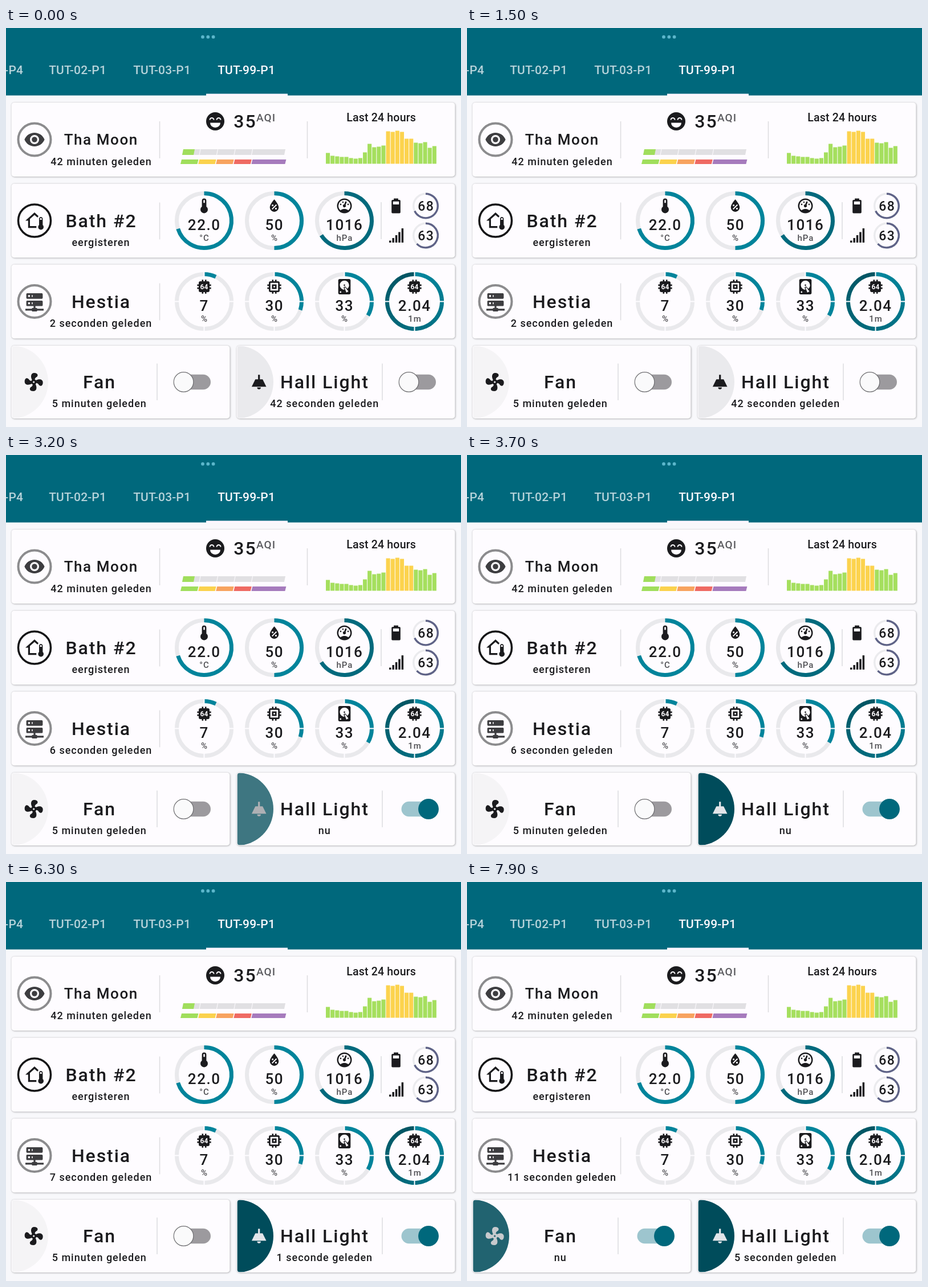
Recreate the animation shown at these times as an HTML page. Size 798 px wide and 701 px high, loop 8 s.

```html
<!DOCTYPE html>
<html lang="nl">
<head>
<meta charset="utf-8">
<title>Dashboard</title>
<style>
  html, body { margin: 0; width: 100%; height: 100%; overflow: hidden; background: #f8f8fb; }
  svg { display: block; width: 798px; height: 701px; }
  text { font-family: Roboto, sans-serif; font-weight: 500; fill: #1b1b1e; }
  .card { fill: #fefcff; filter: drop-shadow(1px 1.5px 1.5px rgba(0,0,0,.2)) drop-shadow(0 0 1px rgba(0,0,0,.18)); }
  .line { stroke: #dedee1; stroke-width: 1.6; }
  .icon { fill-rule: evenodd; }
</style>
</head>
<body>
<svg id="stage" viewBox="0 0 798 701" xmlns="http://www.w3.org/2000/svg"></svg>
<script>
const stage = document.getElementById('stage');
const INK = '#1b1b1e', TEAL = '#00849b', DEEP = '#00687c';

function add(tag, attrs, parent = stage) {
  const el = document.createElementNS('http://www.w3.org/2000/svg', tag);
  for (const k in attrs) el.setAttribute(k, attrs[k]);
  return parent.appendChild(el);
}
const rect = (x, y, width, height, fill, more) => add('rect', { x, y, width, height, fill, ...more });
const circle = (cx, cy, r, more) => add('circle', { cx, cy, r, ...more });
const path = (d, more) => add('path', { d, ...more });

// Centred text; half the tracking is added back so the glyphs sit on x.
function label(x, y, str, size, track = size * .06, more = {}) {
  const el = add('text', { x: x + track / 2, y, 'font-size': size, 'letter-spacing': track,
    'text-anchor': 'middle', ...more });
  el.textContent = str;
  return el;
}
const title = (x, y, str, size = 32) => label(x, y, str, size);
const note = (x, y, str) => label(x, y, str, 18, 1);
const icon = (d, x, y, scale, fill = INK) =>
  path(d, { fill, class: 'icon', transform: `translate(${x} ${y}) scale(${scale}) translate(-12 -12)` });
const divider = (x, y, h = 65) => add('line', { x1: x, x2: x, y1: y, y2: y + h, class: 'line' });
const card = (x, y, width, height) => add('rect', { x, y, width, height, rx: 5, class: 'card' });

const lerp = (a, b, p) => a + (b - a) * p;
const mix = (a, b, p) => `rgb(${a.map((v, i) => Math.round(lerp(v, b[i], p)))})`;

function arc(cx, cy, r, from, to, stroke, width) {
  const at = deg => {
    const a = (deg - 90) * Math.PI / 180;
    return `${cx + r * Math.cos(a)} ${cy + r * Math.sin(a)}`;
  };
  path(`M${at(from)}A${r} ${r} 0 ${to - from > 180 ? 1 : 0} 1 ${at(to)}`,
    { fill: 'none', stroke, 'stroke-width': width });
}

function ring(cx, cy, share, color) {
  circle(cx, cy, 48, { fill: 'none', stroke: '#e9e9ec', 'stroke-width': 7 });
  if (share < 1) return arc(cx, cy, 48, 0, share * 360, color, 7);
  for (let a = 0; a < 360; a += 6)
    arc(cx, cy, 48, a, Math.min(a + 6.5, 360), mix([0, 134, 157], [0, 82, 96], a / 360), 7);
}
function quarters(cx, cy) {
  for (let i = 0; i < 4; i++)
    rect(cx - 1, cy - 53, 2, 10, '#fefcff', { transform: `rotate(${i * 90} ${cx} ${cy})` });
}
function reading(cx, cy, value, unit) {
  label(cx - .5, cy + 16, value, 26);
  label(cx, cy + 35.8, unit, 15, .9, { style: 'fill:#505054' });
}

const CHIP = 'M21 11V9H19V7A2 2 0 0 0 17 5H15V3H13V5H11V3H9V5H7A2 2 0 0 0 5 7V9H3V11H5V13H3V15H5V17A2 2 0 0 0 7 19H9V21H11V19H13V21H15V19H17A2 2 0 0 0 19 17V15H21V13H19V11Z';
const dot = (x, y, r) => `M${x - r} ${y}a${r} ${r} 0 1 0 ${2 * r} 0a${r} ${r} 0 1 0 ${-2 * r} 0Z`;
const ICONS = {
  eye: 'M12 4.5C7 4.5 2.73 7.61 1 12C2.73 16.39 7 19.5 12 19.5C17 19.5 21.27 16.39 23 12C21.27 7.61 17 4.5 12 4.5Z' + dot(12, 12, 5) + dot(12, 12, 3),
  home: 'M19 8C20.1 8 21 8.9 21 10V16.76A3 3 0 1 1 17 16.76V10C17 8.9 17.9 8 19 8M19 9C18.45 9 18 9.45 18 10V11H20V10C20 9.45 19.55 9 19 9M12 5.69L7 10.19V18H14.1L14 19L14.1 20H5V12H2L12 3L16.4 6.96C15.9 7.4 15.5 7.97 15.25 8.61Z',
  server: 'M13 19H14A1 1 0 0 1 15 20H22V22H15A1 1 0 0 1 14 23H10A1 1 0 0 1 9 22H2V20H9A1 1 0 0 1 10 19H11V17H4A1 1 0 0 1 3 16V12A1 1 0 0 1 4 11H20A1 1 0 0 1 21 12V16A1 1 0 0 1 20 17H13ZM4 3H20A1 1 0 0 1 21 4V8A1 1 0 0 1 20 9H4A1 1 0 0 1 3 8V4A1 1 0 0 1 4 3M9 7H10V5H9ZM9 15H10V13H9ZM5 5V7H7V5ZM5 13V15H7V13Z',
  thermo: 'M15 13V5A3 3 0 0 0 9 5V13A5 5 0 1 0 15 13M12 4A1 1 0 0 1 13 5V8H11V5A1 1 0 0 1 12 4Z',
  drop: 'M12 3.25C12 3.25 6 10 6 14A6 6 0 0 0 18 14C18 10 12 3.25 12 3.25M14.47 9.97L15.53 11.03L9.53 17.03L8.47 15.97Z' + dot(9.75, 11.25, 1.25) + dot(14.25, 15.75, 1.25),
  gauge: dot(12, 12, 10) + 'M12 4A8 8 0 0 1 17.3 18C14.3 15.3 9.7 15.3 6.7 18A8 8 0 0 1 12 4M14 5.9C13.6 5.9 13.3 6.1 13.1 6.5L11.7 10A2 2 0 1 0 13.6 10.8L15 7.3C15.2 6.6 14.7 5.9 14 5.9' + dot(10, 7, 1) + dot(7, 10, 1) + dot(17, 10, 1),
  battery: 'M16 10H8V6H16M16.67 4H15V2H9V4H7.33A1.33 1.33 0 0 0 6 5.33V20.67A1.33 1.33 0 0 0 7.33 22H16.67A1.33 1.33 0 0 0 18 20.67V5.33A1.33 1.33 0 0 0 16.67 4Z',
  memory: CHIP + 'M17 17H7V7H17ZM15 9H9V15H15ZM13 13H11V11H13Z',
  disk: 'M6 2H18A2 2 0 0 1 20 4V20A2 2 0 0 1 18 22H6A2 2 0 0 1 4 20V4A2 2 0 0 1 6 2M12 4A6 6 0 0 0 12.1 16L11.2 13.8C11 13.3 11.1 12.7 11.6 12.4L12.5 11.9C12.9 11.6 13.5 11.8 13.8 12.3L15.7 14.7A6 6 0 0 0 12 4M12.1 13.3L14.6 19.6L17.2 18.1L13 12.8Z' + dot(12, 10, 1) + dot(7, 19, 1),
  fan: dot(12, 12, 1) + 'M12.5 2C17 2 17.1 5.6 14.75 6.75C13.8 7.2 13.3 8.3 13.1 9.2C13.6 9.4 14 9.7 14.35 10.1C18 8.1 22 8.9 22 12.5C22 17 18.5 17.1 17.3 14.7C16.8 13.7 15.7 13.3 14.8 13.1C14.6 13.6 14.3 14 13.9 14.3C15.9 18 15.1 22 11.5 22C7 22 6.9 18.4 9.25 17.25C10.25 16.75 10.7 15.7 10.9 14.8C10.4 14.6 10 14.3 9.65 13.9C6 15.9 2 15.1 2 11.5C2 7 5.6 6.9 6.75 9.25C7.25 10.25 8.3 10.7 9.2 10.9C9.4 10.4 9.7 10 10.1 9.65C8.15 6 8.95 2 12.5 2Z',
  lamp: 'M8 9H11V4H13V9H16L20 17.2H4ZM14 18A2 2 0 0 1 10 18Z'
};

// Header
rect(0, 0, 798, 118.5, DEEP);
for (let i = 0; i < 3; i++) circle(345 + i * 9.3, 15.7, 2.9, { fill: '#5cb6cb' });
label(30, 80.6, 'TUT-01-P4', 21, .15, { style: 'fill:#b6d3da;text-anchor:end' });
label(125.5, 80.6, 'TUT-02-P1', 21, .15, { style: 'fill:#b6d3da' });
label(273.5, 80.6, 'TUT-03-P1', 21, .15, { style: 'fill:#b6d3da' });
label(421.5, 80.6, 'TUT-99-P1', 21, .15, { style: 'fill:#fdfaff' });
rect(351, 115.5, 143, 3.5, '#fdf6ff');

function row(y, name, size, art, tone, edge, thick) {
  card(9.5, y, 778, 130);
  circle(50, y + 65, 28.5, { fill: 'none', stroke: edge, 'stroke-width': thick });
  icon(art, 50, y + 65, 1.6, tone);
  title(166, y + 65 + size * .356, name, size);
  divider(269.5, y + 33);
}

// Air quality
row(131, 'Tha Moon', 26, ICONS.eye, '#3d3d40', '#8c8c8e', 4);
note(166.5, 241.3, '42 minuten geleden');
circle(367, 164, 16, { fill: INK });
path('M357.500 161.500a3.500 3.500 0 0 1 7 0M369.500 161.500a3.500 3.500 0 0 1 7 0',
  { fill: 'none', stroke: '#fefcff', 'stroke-width': 2 });
path('M358 166.500H376A9 8.500 0 0 1 358 166.500Z', { fill: '#fefcff' });
label(418.5, 175.3, '35', 32);
label(455.5, 164, 'AQI', 19, 1.1, { style: 'fill:#5c5c60' });

const slant = (x, y, w, h, fill) => path(`M${x + 2} ${y}h${w}l-2 ${h}h${-w}Z`, { fill });
const SCALE = ['#a0de5c', '#fbd24d', '#f8a35f', '#ef6a63', '#a67bbd'];
SCALE.forEach((c, i) => {
  const w = i < 4 ? 29.5 : 59;
  slant(309 + i * 30.5, 213, i < 4 ? w : 57, 10, '#e1e0e3');
  slant(306 + i * 31.1, 231, w, 8, c);
});
slant(309, 213, 20, 10, SCALE[0]);
divider(528.5, 164);
label(658, 164.3, 'Last 24 hours', 19.5, .2);
[19, 14, 13, 12, 12, 10, 9, 10, 20, 35, 29, 30, 32, 57, 56, 58, 56, 44, 44, 37, 36, 38, 28, 31].forEach((h, i) =>
  rect(561 + i * 8.12, 238.5 - h, 7.1, h, i > 12 && i < 19 ? '#fcd34e' : '#a5df5e'));

// Bathroom
row(273.5, 'Bath #2', 32, ICONS.home, INK, '#141416', 3.5);
note(166, 383.3, 'eergisteren');
[['22.0', '°C', .702, ICONS.thermo, TEAL], ['50', '%', .5, ICONS.drop, TEAL], ['1016', 'hPa', .66, ICONS.gauge, '#006a7d']]
  .forEach(([value, unit, share, art, color], i) => {
    const x = 347.5 + i * 123;
    ring(x, 338.5, share, color);
    icon(art, x, 312.5, 1.3);
    reading(x, 338.5, value, unit);
  });
divider(658, 306);
icon(ICONS.battery, 684, 312.5, 1.3);
for (let i = 0; i < 5; i++) {
  const h = [3.5, 8, 13, 18.5, 25][i];
  rect(672 + i * 5.4, 377 - h, 3.5, h, INK);
}
[68, 63].forEach((v, i) => {
  const y = 312.5 + i * 52;
  circle(736, y, 21.3, { fill: 'none', stroke: '#ebebee', 'stroke-width': 3.4 });
  arc(736, y, 21.3, 0, v * 3.6, '#5f6387', 3.4);
  label(736, y + 8.2, v, 23);
});

// Server
row(415.5, 'Hestia', 32, ICONS.server, '#3d3d40', '#8c8c8e', 4);
const hestia = note(166, 525.3, '');
[['7', '%', .07, CHIP], ['30', '%', .3, ICONS.memory], ['33', '%', .335, ICONS.disk], ['2.04', '1m', 1, CHIP]]
  .forEach(([value, unit, share, art], i) => {
    const x = 347.5 + i * 123;
    ring(x, 480.5, share, TEAL);
    quarters(x, 480.5);
    icon(art, x, 454.5, 1.35);
    if (art === CHIP) label(x, 458.7, '64', 12, 0, { style: 'fill:#fefcff;font-weight:700' });
    reading(x, 480.5, value, unit);
  });

// Switch cards
function device(x, width, name, art, off) {
  const id = 'clip' + x;
  card(x, 558, width, 128);
  rect(x + 1.2, 558.7, width - 2, 126.6, INK, { rx: 4 });
  const box = stage.lastChild;
  add('clipPath', { id }).append(box);
  const disc = circle(x + .5, 622, 64, { 'clip-path': `url(#${id})` });
  const glyph = icon(art, x + 39.2, 622, 1.6);
  title(x + 153.5, 633.4, name);
  const text = note(x + 153.8, 666.3, '');
  divider(x + 255.5, 589.5, 64.5);
  const track = rect(x + 289, 608.8, 60.5, 26.4, '', { rx: 13.2 });
  const knob = circle(0, 622, 17.3, { 'stroke-width': 1.2 });
  return (t, str) => {
    const p = ease(t / 1000), k = ease(t / 150);
    disc.setAttribute('fill', mix(off, [0, 76, 91], p));
    glyph.setAttribute('fill', mix([27, 27, 30], [226, 229, 233], p));
    track.setAttribute('fill', mix([156, 154, 158], [157, 197, 206], k));
    knob.setAttribute('fill', mix([250, 250, 251], [0, 104, 124], k));
    knob.setAttribute('stroke', mix([112, 112, 115], [0, 104, 124], k));
    knob.setAttribute('cx', x + lerp(302, 336.5, k));
    text.textContent = str;
  };
}

// The CSS "ease" curve: cubic-bezier(.25, .1, .25, 1)
function ease(x) {
  if (x <= 0) return 0;
  if (x >= 1) return 1;
  const curve = (s, a, b) => 3 * s * (1 - s) * (1 - s) * a + 3 * s * s * (1 - s) * b + s ** 3;
  let lo = 0, hi = 1;
  for (let i = 0; i < 24; i++) {
    const mid = (lo + hi) / 2;
    if (curve(mid, .25, .25) < x) lo = mid; else hi = mid;
  }
  return curve(lo, .1, 1);
}

const fan = device(9.5, 383, 'Fan', ICONS.fan, [245, 244, 246]);
const light = device(404.5, 383, 'Hall Light', ICONS.lamp, [234, 234, 237]);

const LOOP = 8000, LIGHT_ON = 2760, FAN_ON = 7330;
const TICKS = [2400, 3850, 7500];
const pick = (t, times, words) => words[times.filter(s => t >= s).length];

function draw(now) {
  const t = now % LOOP;
  hestia.textContent = pick(t, TICKS, [2, 6, 7, 11]) + ' seconden geleden';
  light(t - LIGHT_ON, pick(t, [TICKS[0], LIGHT_ON, TICKS[1], TICKS[2]],
    ['42 seconden geleden', '1 minuut geleden', 'nu', '1 seconde geleden', '5 seconden geleden']));
  fan(t - FAN_ON, t < FAN_ON ? '5 minuten geleden' : 'nu');
}
const start = performance.now();
function frame() {
  draw(performance.now() - start);
  requestAnimationFrame(frame);
}
frame();
</script>
</body>
</html>
```
